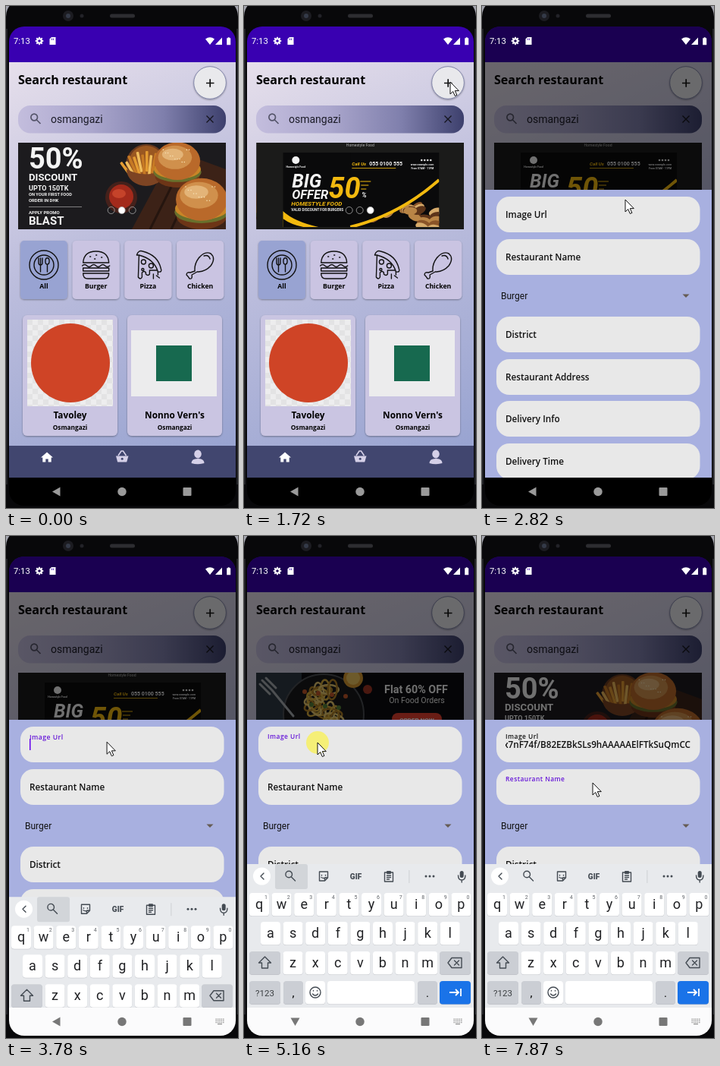
Animation of 306x661 px, one loop 8000 ms. Source, as an HTML page:

```html
<!DOCTYPE html>
<html lang="en">
<head>
<meta charset="utf-8">
<title>Restaurant app</title>
<style>
html, body { margin: 0; width: 100%; height: 100%; overflow: hidden; background: #000; }
svg { display: block; width: 100%; height: 100%; font-family: "Open Sans", "Noto Sans", sans-serif; }
.rb { font-family: Roboto, Arial, sans-serif; }
.mid { text-anchor: middle; }
.line { fill: none; stroke: #111; stroke-width: 1.4; stroke-linecap: round; stroke-linejoin: round; }
.key { fill: none; stroke: #444b53; stroke-width: 1.4; stroke-linecap: round; stroke-linejoin: round; }
.promo { font-family: Roboto, Arial, sans-serif; font-weight: 700; fill: #f4f4f4; }
.field { font-size: 11.7px; font-weight: 600; }
</style>
</head>
<body>
<svg id="stage" viewBox="0 0 306 661"></svg>
<script>
const LOOP = 8000, BANNER_W = 274;

const rect = (x, y, w, h, fill, rx = 0, more = '') =>
  `<rect x="${x}" y="${y}" width="${w}" height="${h}" rx="${rx}" fill="${fill}" ${more}/>`;
const circle = (x, y, r, fill, more = '') => `<circle cx="${x}" cy="${y}" r="${r}" fill="${fill}" ${more}/>`;
const oval = (x, y, rx, ry, fill, more = '') =>
  `<ellipse cx="${x}" cy="${y}" rx="${rx}" ry="${ry}" fill="${fill}" ${more}/>`;
const path = (d, more) => `<path d="${d}" ${more}/>`;
const text = (x, y, size, str, more = '') => `<text x="${x}" y="${y}" font-size="${size}" ${more}>${str}</text>`;
const group = (id, body, more = '') => `<g id="${id}" ${more}>${body}</g>`;
const repeat = (n, fn) => Array.from({ length: n }, (_, i) => fn(i)).join('');

const lens = (x, y, more) => path(`M${x + 1.5} ${y + 1.5}l5 5M${x + 2.5} ${y - 2}a4.3 4.3 0 1 1-8.6 0a4.3 4.3 0 1 1 8.6 0`, more);

function defs() {
  const clip = (id, x, y, w, h, rx = 0) => `<clipPath id="${id}">${rect(x, y, w, h, '#000', rx)}</clipPath>`;
  const fade = (id, attrs, stops) => `<linearGradient id="${id}" ${attrs}>` +
    stops.map(([o, c]) => `<stop offset="${o}" stop-color="${c}"/>`).join('') + '</linearGradient>';
  return '<defs>' +
    clip('screen', 4, 27, 299, 631, 20) + clip('app', 4, 27, 299, 594) +
    clip('banner', 16, 180, BANNER_W, 114) + clip('entry', 31, 260, 245, 30) +
    clip('bigAd', 51, 193, 206, 98) +
    fade('page', 'gradientUnits="userSpaceOnUse" x1="40" y1="60" x2="270" y2="590"',
      [[0, '#e6dfeb'], [.45, '#bdbedd'], [1, '#99a4d1']]) +
    fade('pill', '', [[0, '#c3bddd'], [.35, '#aba7cd'], [.7, '#7f7fac'], [1, '#3d406d']]) +
    `<pattern id="check" width="14" height="14" x="28" y="413" patternUnits="userSpaceOnUse">
      ${rect(0, 0, 14, 14, '#ededee')}${rect(0, 0, 7, 7, '#e3e3e4')}${rect(7, 7, 7, 7, '#e3e3e4')}</pattern>
    <filter id="soft" x="-20%" y="-20%" width="140%" height="150%">
      <feDropShadow dx="0" dy="1" stdDeviation="1.3" flood-opacity=".35"/></filter></defs>`;
}

function phone() {
  return rect(0, 0, 306, 661, '#a3a4ad') + rect(0, -10, 306, 700, '#08080a', 24) +
    path('M1 30V630M305 30V630', 'fill="none" stroke="#34353b" stroke-width="1.2"') +
    circle(82, 13, 7, '#1c1c21') + circle(82, 13, 3, '#343a48') + circle(100, 13, 2.5, '#222228') +
    rect(137, 10.5, 33, 5, '#2d2d31', 2.5);
}

function statusIcons() {
  const teeth = repeat(8, i => rect(43, 40.8, 2, 3, '#fff', 0, `transform="rotate(${i * 45} 44 46)"`));
  return text(10, 50, 11.3, '7:13', 'class="rb" fill="#fff"') + teeth +
    circle(44, 46, 2.8, 'none', 'stroke="#fff" stroke-width="2"') +
    path('M60 41h5.5v10h-8v-7.5z', 'fill="#fff"') + rect(60, 42.5, .8, 2.5, '#3700b3') +
    rect(62, 42.5, .8, 2.5, '#3700b3') +
    path('M263 43.5Q269 39 275 43.5L269 51zM276 51h9v-9.5z', 'fill="#fff"') +
    path('M291.2 42.2h1.500v-1h2v1h1.500v9h-5z', 'fill="#fff"');
}

function flatSlide() {
  const noodles = repeat(26, i => {
    const a = i * 2.4, r = 6 * Math.sqrt(i);
    return oval(105 + r * Math.cos(a), 230 + r * Math.sin(a), 13, 6,
      'none', `stroke="${['#d6ad3d', '#b07e25', '#e8ca70'][i % 3]}" stroke-width="2.5" transform="rotate(${i * 47} 105 230)"`);
  });
  return rect(16, 180, BANNER_W, 114, '#0c0c0f') + rect(16, 180, 60, 114, '#2d3844') +
    circle(105, 235, 53, '#17181b', 'stroke="#4a4d52" stroke-width="2"') + noodles +
    repeat(7, i => circle(80 + i * 9, 205 + (i * 17) % 32, 3, i % 2 ? '#558238' : '#c4572a')) +
    path('M24 190l14 14M21 195l13 13M29 187l13 13M37 203l28 34', 'stroke="#a8adb1" stroke-width="3" fill="none" stroke-linecap="round"') +
    circle(144, 187, 13, '#d99a31') + circle(144, 187, 9, '#efc45f') + circle(163, 202, 6, '#a33524') +
    text(227, 207, 14.3, 'Flat 60% OFF', 'class="promo mid"') +
    text(228, 220, 10.6, 'On Food Orders', 'class="rb mid" fill="#f4f4f4"') +
    rect(195, 233, 66, 16, '#e5402f', 8) + text(228, 245, 8, 'ORDER NOW', 'class="promo mid"');
}

function burger(x, y, r) {
  return oval(x, y + r * .5, r * .95, r * .5, '#6d3517') + oval(x, y + r * .35, r * 1.02, r * .42, '#69702c') +
    oval(x, y + r * .22, r, r * .42, '#c98527') + oval(x, y - r * .12, r * .97, r * .8, '#b9692a') +
    oval(x - r * .1, y - r * .28, r * .72, r * .5, '#d0904c') + oval(x - r * .2, y - r * .4, r * .45, r * .25, '#e3b478') +
    repeat(12, i => circle(x - r * .6 + (i * 7 % 12) * r * .1, y - r * .6 + (i * 3 % 5) * r * .13, .8, '#f6deb0'));
}

function burgerSlide() {
  const lines = [[214, 38, '50%'], [230, 13.2, 'DISCOUNT'], [243, 9, 'UPTO 150TK'], [250, 5.7, 'ON YOUR FIRST FOOD'],
    [258, 5.9, 'ORDER IN DHK'], [274, 6, 'APPLY PROMO'], [288, 15, 'BLAST']];
  const fries = repeat(13, i => rect(166 + i * 3, 188 + (i * 5) % 9, 3.6, 27, ['#e39b32', '#f0bd5c', '#c77a24'][i % 3], 1,
    `transform="rotate(${(i - 6) * 6} 187 222)"`));
  return rect(16, 180, BANNER_W, 114, '#1c1b1e') +
    path('M166 294L222 190L290 215V294z', 'fill="#3c2217"') +
    path('M190 294L228 218M218 294L244 238', 'stroke="#25150f" stroke-width="3"') +
    circle(185, 209, 27, '#6b3b1f') + circle(185, 207, 23, '#9a5721') + fries +
    path('M159 215a26 22 0 0 0 52 0q-26 13-52 0z', 'fill="#7d4423"') +
    circle(152, 252, 21, '#45211b') + circle(152, 251, 16, '#a32a1b') + oval(149, 247, 9, 6, '#c5432a') +
    burger(226, 208, 31) + burger(258, 259, 35) +
    lines.map(([y, s, str]) => text(30, y, s, str, 'class="promo"')).join('') + rect(30, 264, 70, .8, '#999');
}

function bigSlide() {
  const slant = 'class="promo" font-style="italic"';
  const food = repeat(34, i => oval(180 + (i * 23) % 80, 246 + (i * 13) % 45, 9, 5,
    ['#8a5428', '#b98546', '#5c3419', '#d6ab6b'][i % 4], `transform="rotate(${i * 31 % 70 - 45} 215 270)"`));
  return rect(16, 180, BANNER_W, 114, '#1b1b1a') +
    text(153, 185, 5.1, 'Homestyle Food', 'class="rb mid" fill="#b5b5b5"') +
    `<g clip-path="url(#bigAd)">` + rect(51, 193, 206, 98, '#0a0a0b') +
    path('M51 270Q66 284 98 291H51z', 'fill="#f2b90f"') + path('M51 280Q62 288 78 291H51z', 'fill="#0a0a0b"') +
    food + path('M140 291Q205 275 257 229V193H140z', 'fill="#0a0a0b"') +
    path('M140 291Q205 275 257 229', 'fill="none" stroke="#f2b90f" stroke-width="4"') + '</g>' +
    circle(68, 203, 5, '#f4f4f4') + text(68, 213, 3.5, 'Homestyle Food', 'class="promo mid"') +
    text(142, 210, 6.2, 'Call Us', 'class="promo" font-style="italic" style="fill:#f2b90f"') +
    text(165, 210, 7, '055 0100 555', 'class="promo"') + rect(142, 213, 58, .8, '#f2b90f') +
    repeat(4, i => circle(234 + i * 4, 203, 1.3, '#ddd')) +
    text(250, 210, 3.6, 'www.example.com', 'class="promo" text-anchor="end"') +
    text(250, 215, 3.4, 'From 07AM - 11PM', 'class="promo" text-anchor="end"') +
    text(63, 239, 25, 'BIG', slant) + text(63, 254, 16.5, 'OFFER', slant) +
    text(111, 253, 38, '50', slant + ' style="fill:#f2b90f"') + text(155, 252, 9, '%', slant) +
    path('M153 231h14M154 236h10M154 241h7', 'stroke="#f2b90f" stroke-width="1.2"') +
    text(62, 263, 8, 'HOMESTYLE FOOD', slant + ' style="fill:#f2b90f"') +
    text(62, 270, 4.7, 'VALID DISCOUNT FOR BURGERS', 'class="promo"');
}

const foodIcons = [
  circle(0, 0, 19, 'none') + circle(0, 0, 13, 'none') +
    path('M-7-9v6q0 3 2.500 3q2.500 0 2.500-3v-6M-4.500-9V9', '') + oval(4.5, -5, 2.6, 4.2, 'none') + path('M4.500 0V9', ''),
  path('M-17-3Q-16-18 0-18Q16-18 17-3zM-18 1q3-3 6 0t6 0t6 0t6 0t6 0t6 0M-17 4H17v4H-17zM-17 11H17Q17 18 11 18H-11Q-17 18-17 11zM-8-11h1M0-13h1M7-10h1M-2-8h1', ''),
  path('M-15-13Q-13-20-7-18Q13-13 17 5Q19 10 13 9Q8-8-12-13zM-12-12L-13 16q3 4 5 0v-6q3-3 5 0v2q3 3 5 0v-5l10 0', '') +
    circle(-6, -4, 3, 'none') + circle(4, 1, 3, 'none') + circle(-7, 6, 1.5, 'none') + path('M7 12v6M11 14l4 3M13 9v4', ''),
  path('M-7 8Q-8-1-2-9Q6-19 14-15Q21-9 14 1Q7 9-4 9L-11 13Q-10 19-14 18Q-16 15-18 13Q-18 9-13 10zM5-12Q11-14 13-8', '')
];

function home() {
  const category = (name, i) => {
    const x = 19 + i * 68.7;
    return rect(x, 309, 62, 77, i ? '#cac4e2' : '#98a3d2', 5, 'filter="url(#soft)"') +
      `<g class="line" transform="translate(${x + 31} 341)">${foodIcons[i]}</g>` +
      text(x + 31, 372, 8.7, name, 'class="mid" font-weight="700"');
  };
  const card = (x, name) => rect(x, 407, 125, 159, '#cac5e2', 6, 'filter="url(#soft)"') +
    text(x + 62.5, 543, 11.8, name, 'class="mid" font-weight="700"') +
    text(x + 62.5, 557.5, 8.3, 'Osmangazi', 'class="mid" font-weight="700"');
  return rect(4, 27, 299, 47, '#3900b1') + rect(4, 74, 299, 505, 'url(#page)') +
    text(16, 103, 16.1, 'Search restaurant', 'font-weight="700"') +
    circle(269, 101, 21.3, '#e9e9ec', 'stroke="#70759f" stroke-width=".8" filter="url(#soft)"') +
    path('M264 101.5h10.500M269.200 96.300v10.500', 'stroke="#111" stroke-width="1.7"') +
    rect(16, 131, 274, 36.5, 'url(#pill)', 16) + lens(39, 148.5, 'fill="none" stroke="#55556a" stroke-width="1.7"') +
    text(59, 154, 14, 'osmangazi', 'class="rb" fill="#1c1c28"') +
    path('M264.500 144.500l9 9m0-9l-9 9', 'stroke="#15151f" stroke-width="1.4"') +
    `<g clip-path="url(#banner)">` + group('slide0', flatSlide()) + group('slide1', burgerSlide()) + group('slide2', bigSlide()) + '</g>' +
    repeat(3, i => circle(138.7 + i * 14, 269, 4.5, 'none', `id="dot${i}" stroke="#aaa" stroke-width=".8"`)) +
    ['All', 'Burger', 'Pizza', 'Chicken'].map(category).join('') +
    card(22, 'Tavoley') + rect(28, 413, 113, 114, 'url(#check)') + circle(85, 470, 52, '#cf4426') +
    card(160, "Nonno Vern's") + rect(165, 427, 113, 87, '#ececed') + rect(198, 447, 47, 47, '#17694f') +
    rect(4, 579, 299, 42, '#41466f') +
    path('M46 594.500l8-7 8 7h-2.300v6h-4v-4h-3.400v4h-4v-6z', 'fill="#fff"') +
    path('M145 592.500h16.500l-2.300 8h-12z', 'fill="#d5d0e8"') + path('M148 592l4-6h2.500l4 6', 'fill="none" stroke="#d5d0e8" stroke-width="1.6"') +
    circle(153.2, 596.3, 1.5, '#41466f') + oval(253, 590, 4.8, 5.4, '#d5d0e8') +
    path('M244.500 602q0-6 8.500-6t8.500 6q-8.500 2.500-17 0z', 'fill="#d5d0e8"');
}

function sheet() {
  const tops = [251, 307, 409, 465, 520, 576];
  const names = ['Image Url', 'Restaurant Name', 'District', 'Restaurant Address', 'Delivery Info', 'Delivery Time'];
  return rect(4, 242, 299, 379, '#a8b0e0') +
    tops.map((y, i) => rect(19, y, 268.5, 47, '#e8e8e8', 17) +
      `<text id="label${i}" class="field" fill="#111" transform="translate(31 ${y + 28})">${names[i]}</text>`).join('') +
    text(25, 386, 12, 'Burger', 'class="rb" fill="#111"') + path('M264.500 379.500h9l-4.500 4.500z', 'fill="#665c55"') +
    `<g clip-path="url(#entry)">` + text(275, 279, 11.7, 'x7nF74f/B82EZBkSLs9hAAAAAElFTkSuQmCC', 'id="pasted" class="field" fill="#111" text-anchor="end"') + '</g>' +
    rect(31, 267, 1.5, 15, '#6200ee', 0, 'id="caret"') +
    path('M32 283Q39.500 288.500 39.500 293a7.500 7.500 0 0 1-15 0Q24.500 288.500 32 283z', 'id="handle" fill="#6200ee"') +
    group('menu', rect(19, 226, 56, 31, '#fff', 3, 'filter="url(#soft)"') + text(47, 245.5, 11, 'Paste', 'class="rb mid" fill="#222"'));
}

function keyboard() {
  const dark = '#cbced4';
  const cap = (x, y, w, fill = '#fff') => rect(x, y + 1, w, 30, '#b9bcc2', 4) + rect(x, y, w, 30.5, fill, 4);
  const row = (letters, x0, y, digits) => [...letters].map((ch, i) => {
    const x = x0 + i * 29.6;
    return cap(x - 13, y, 26) + text(x, y + 21, 18, ch, 'class="rb mid" fill="#202124"') +
      (digits ? text(x + 9, y + 8, 7, (i + 1) % 10, 'class="rb mid" fill="#5f6368"') : '');
  }).join('');
  const icons = path('M26 444l-4 4 4 4M99.500 442h11v8l-4 4h-7zM110.500 450h-4v4M102.500 446.500v.5M107.500 446.500v.5M102 449.500q3 2 6 0M185.500 443h11v12h-11zM188.500 447h5M188.500 449.500h5M188.500 452h3', 'class="key"') +
    rect(188, 441, 6, 4, '#444b53', 1) +
    lens(61, 447.5, 'class="key"') + text(147.5, 452, 10, 'GIF', 'class="rb mid" font-weight="900" fill="#444b53"') +
    rect(217.5, 440, .8, 17, '#c6c9ce') + repeat(3, i => circle(240 + i * 5, 448, 1.5, '#444b53')) +
    rect(284.7, 441, 5, 9, '#444b53', 2.5) + path('M282.500 447q0 6 4.700 6t4.700-6M287.200 453v3', 'class="key"');
  return rect(4, 432, 299, 189, '#e8eaed') + rect(41, 432, 43, 33, '#d2d5d9', 3, 'id="chip"') + circle(23.5, 448, 11.5, '#fff') + icons +
    row('qwertyuiop', 20, 470, true) + row('asdfghjkl', 35, 508) + row('zxcvbnm', 64.5, 547) +
    cap(7, 547, 41, dark) + path('M27.500 554l8 8h-4v7h-8v-7h-4z', 'class="key"') +
    cap(258, 547, 41, dark) + path('M269 562l5-6.500h13v13h-13zM277.500 559l6 6m0-6l-6 6', 'class="key"') +
    cap(7, 586, 41, dark) + text(27.5, 605.5, 11.5, '?123', 'class="rb mid" fill="#3c4043"') +
    cap(52, 586, 26, dark) + text(65, 607, 15, ',', 'class="rb mid"') +
    cap(81, 586, 26) + circle(94, 601, 7, 'none', 'stroke="#444b53" stroke-width="1.4"') +
    path('M91.500 598.500v.5M96.500 598.500v.5M90.500 603q3.500 4 7 0', 'class="key"') + cap(110, 586, 115) +
    cap(229, 586, 26, dark) + text(242, 607, 15, '.', 'class="rb mid"') +
    cap(258, 586, 41, '#1a73e8') + path('M271 601h12M279 597l4 4-4 4M286 596v10', 'fill="none" stroke="#fff" stroke-width="1.8"');
}

function systemNav() {
  return rect(4, 621, 299, 37, '#000', 0, 'id="navBg"') +
    group('navIcons', path('M61 639.500l10.500-6v12z', 'id="back"') + `<circle cx="153" cy="639.5" r="5.7"/><rect x="233.5" y="634" width="11" height="11" rx="1"/>`) +
    group('kbIcon', repeat(15, i => rect(276.5 + i % 5 * 2.4, 635.5 + Math.floor(i / 5) * 2.2, 1.4, 1.3, '#8f8f8f')) +
      rect(279, 642, 6, 1.2, '#8f8f8f'));
}

const stage = document.getElementById('stage');
stage.innerHTML = defs() + phone() + `<g clip-path="url(#screen)">
  <g clip-path="url(#app)">${home()}${rect(4, 27, 299, 594, '#000', 0, 'id="scrim"')}${group('sheet', sheet())}${group('keyboard', keyboard())}</g>
  ${statusIcons()}${systemNav()}</g>` +
  circle(0, 0, 15, '#f6f06a', 'id="press" opacity=".9"') +
  path('M0 0V16L3.700 12.500L6.300 18.500L8.900 17.400L6.300 11.600H11.300z', 'id="pointer" fill="#fff" stroke="#111" stroke-width="1"');

const el = {};
stage.querySelectorAll('[id]').forEach(node => { el[node.id] = node; });

const set = (id, name, value) => el[id].setAttribute(name, value);
const show = (id, on) => set(id, 'visibility', on ? 'visible' : 'hidden');
const move = (id, x, y) => set(id, 'transform', `translate(${x} ${y})`);
const ramp = (t, start, len) => Math.min(1, Math.max(0, (t - start) / len));
const easeOut = p => 1 - (1 - p) ** 3;
const smooth = p => p * p * (3 - 2 * p);
const mix = (a, b, p) => a + (b - a) * p;

// time, x, y
const trail = [[660, 303, 655], [1440, 283, 132], [1720, 272, 100], [2250, 272, 100], [2820, 189, 255], [3100, 140, 272],
  [3240, 137, 271], [3700, 137, 271], [4100, 100, 273], [4340, 100, 273], [4700, 97, 272], [5600, 97, 272],
  [6080, 45, 238], [6270, 45, 238], [6470, 93, 327], [6900, 95, 337], [7200, 95, 337], [7870, 146, 325]];
const presses = [[1980, 2150], [3500, 3650], [4780, 5560], [6120, 6270], [7030, 7170]];

function pointerAt(t) {
  const next = trail.findIndex(k => k[0] > t);
  if (next < 1) return trail[next < 0 ? trail.length - 1 : 0].slice(1);
  const [t0, x0, y0] = trail[next - 1], [t1, x1, y1] = trail[next];
  const p = smooth((t - t0) / (t1 - t0));
  return [mix(x0, x1, p), mix(y0, y1, p)];
}

function floatLabel(i, top, p, color) {
  set('label' + i, 'transform', `translate(31 ${mix(top + 28, top + 16, p)}) scale(${mix(1, .72, p)})`);
  set('label' + i, 'letter-spacing', p * .65);
  set('label' + i, 'fill', color);
}

function draw(t) {
  const page = 1 + [1290, 4300, 7310].reduce((sum, s) => sum + easeOut(ramp(t, s, 480)), 0);
  for (let i = 0; i < 3; i++) {
    const d = (i - page + 4.5) % 3 - 1.5;
    move('slide' + i, (d < -1.5 ? d + 3 : d) * BANNER_W, 0);
    set('dot' + i, 'fill', Math.round(page) % 3 === i ? '#fff' : 'none');
  }

  const open = ramp(t, 2230, 270);
  set('scrim', 'opacity', .54 * smooth(open));
  move('sheet', 0, 379 * (1 - smooth(open)));
  show('sheet', open > 0);

  const first = t >= 3640, second = t >= 7200;
  floatLabel(0, 251, smooth(ramp(t, 3640, 170)), first && !second ? '#6515d8' : '#111');
  floatLabel(1, 307, smooth(ramp(t, 7200, 170)), second ? '#6515d8' : '#111');

  const filled = t >= 6660;
  show('pasted', filled);
  show('handle', t >= 5230 && !filled);
  set('menu', 'opacity', ramp(t, 5570, 120) * (1 - ramp(t, 6270, 110)));
  const since = t - (second ? 7200 : 3660);
  show('caret', since >= 0 && Math.floor(since / 500) % 2 === 0);
  set('caret', 'x', filled && !second ? 274.5 : 31);
  set('caret', 'y', second ? 323 : 267);

  const rise = easeOut(ramp(t, 3680, 260));
  move('keyboard', 0, 189 * (1 - rise));
  show('keyboard', rise > 0);
  set('chip', 'opacity', 1 - ramp(t, 7250, 200));
  const light = rise > .3;
  set('navBg', 'fill', light ? '#fbfbfc' : '#000');
  set('navIcons', 'fill', light ? '#777' : '#9a9a9a');
  show('kbIcon', light);
  set('back', 'transform', `rotate(${-90 * smooth(ramp(t, 4340, 220))} 67 639)`);

  const [x, y] = pointerAt(t);
  move('pointer', x, y);
  move('press', x, y);
  show('pointer', t >= 660);
  show('press', presses.some(([a, b]) => t >= a && t < b));
}

const start = performance.now();
function tick() {
  draw((performance.now() - start) % LOOP);
  requestAnimationFrame(tick);
}
tick();
</script>
</body>
</html>
```
